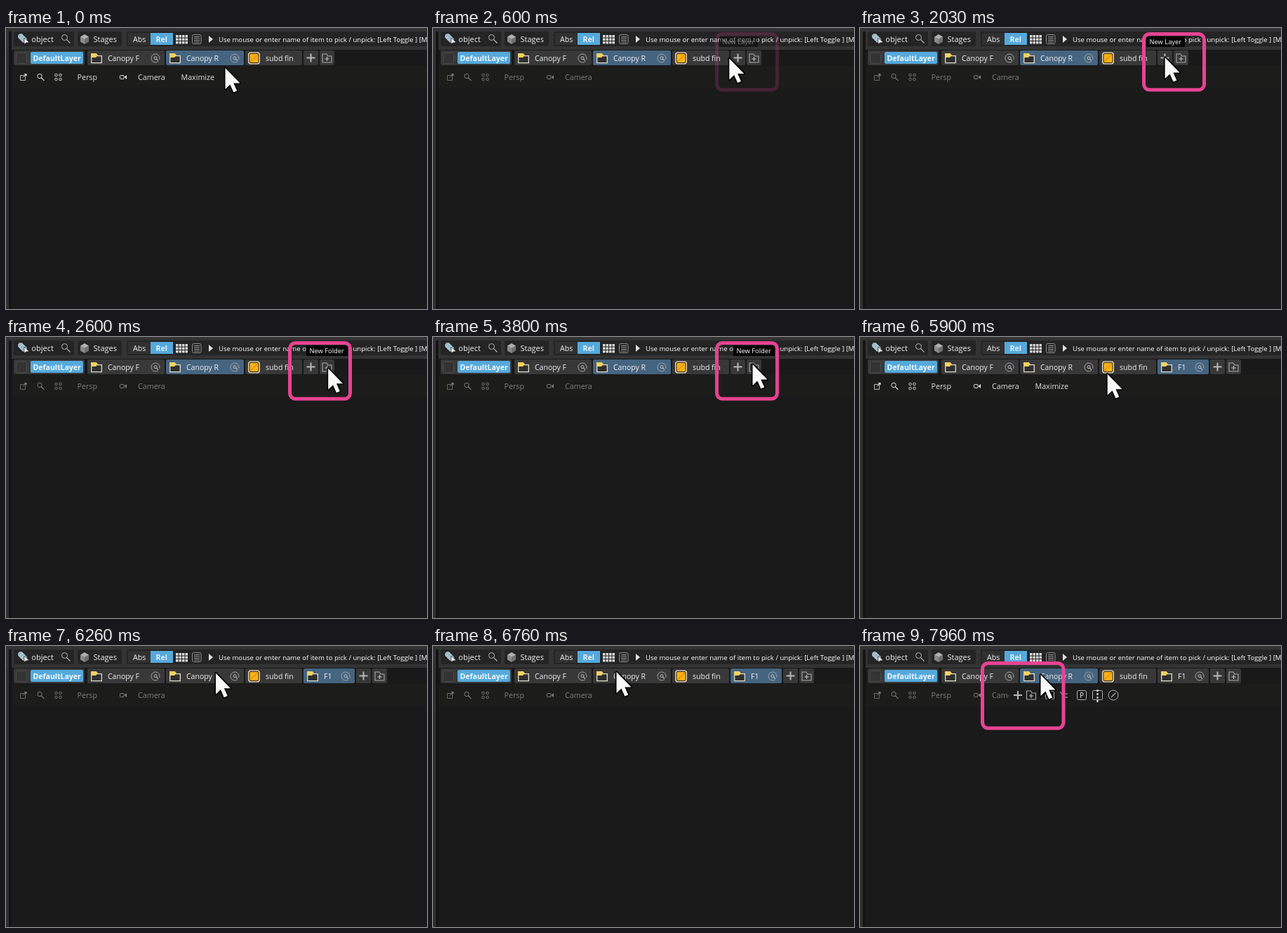
An HTML page with a canvas that plays this animation: 600x400 px, repeating every 8 s.

```html
<!DOCTYPE html>
<html lang="en">
<head>
<meta charset="utf-8">
<title>Layer tabs</title>
<style>
html, body { margin: 0; width: 100%; height: 100%; overflow: hidden; background: #1a1a1a; }
canvas { display: block; }
</style>
</head>
<body>
<canvas id="stage" width="600" height="400"></canvas>
<script>
const c = document.getElementById('stage').getContext('2d');
const LOOP = 8000, PINK = '#e84393', BLUE = '#55a9dc', TAB = '#383838', ACTIVE = '#456480', GROUP = '#242424';

// Each move eases the cursor to (x, y); bend bows the way there
const home = { x: 312, y: 57 };
const moves = [
  { from: 30, to: 800, x: 434, y: 42 },
  { from: 2030, to: 2360, x: 460, y: 47 },
  { from: 2560, to: 2800, x: 455, y: 39 },
  { from: 4430, to: 4960, x: 458, y: 68, bend: [22, -27] },
  { from: 5530, to: 6330, x: 296, y: 38, bend: [0, 5] },
  { from: 6360, to: 6760, x: 261, y: 37 },
  { from: 7900, to: 7960, x: 257, y: 41 }
];

const ramp = (t, a, b) => Math.min(1, Math.max(0, (t - a) / (b - a)));
const pulse = (t, a, b, d, e) => ramp(t, a, b) * (1 - ramp(t, d, e));
const easeOut = k => 1 - (1 - k) ** 1.7;

function cursorAt(t) {
  let { x, y } = home;
  for (const m of moves) {
    const p = easeOut(ramp(t, m.from, m.to)), bow = Math.sin(Math.PI * p);
    const [bx, by] = m.bend || [0, 0];
    x += (m.x - x) * p + bx * bow;
    y += (m.y - y) * p + by * bow;
  }
  return [x, y];
}

function paint(fill, stroke, lw = 1) {
  if (fill) { c.fillStyle = fill; c.fill(); }
  if (stroke) { c.strokeStyle = stroke; c.lineWidth = lw; c.stroke(); }
}

function box(x, y, w, h, fill, r = 0, stroke, lw) {
  c.beginPath();
  c.roundRect(x, y, w, h, r);
  paint(fill, stroke, lw);
}

function poly(points, fill, stroke, lw) {
  c.beginPath();
  for (let i = 0; i < points.length; i += 2) c.lineTo(points[i], points[i + 1]);
  c.closePath();
  paint(fill, stroke, lw);
}

function line(x1, y1, x2, y2, color, lw) {
  c.beginPath();
  c.moveTo(x1, y1);
  c.lineTo(x2, y2);
  paint(null, color, lw);
}

function ring(x, y, r, color, lw, fill) {
  c.beginPath();
  c.arc(x, y, r, 0, 2 * Math.PI);
  paint(fill, color, lw);
}

function text(s, x, y, size, color = '#f0f0f0', weight = 400) {
  c.font = `${weight} ${size}px "Open Sans", "Noto Sans", sans-serif`;
  c.fillStyle = color;
  c.fillText(s, x, y);
}

function faded(alpha, draw) {
  if (alpha <= 0) return;
  c.save();
  c.globalAlpha = alpha;
  draw();
  c.restore();
}

function lens(x, y, r, color) {
  ring(x, y, r, color, 1);
  line(x + r * .7, y + r * .7, x + r * 2, y + r * 2, color, 1.2);
}

function plus(x, y, r, color = '#b8b8b8', lw = 2) {
  line(x - r, y, x + r, y, color, lw);
  line(x, y - r, x, y + r, color, lw);
}

function folderShape(x, y, w, h, fill, stroke, lw) {
  poly([x, y, x + w * .45, y, x + w * .6, y + 3, x + w, y + 3, x + w, y + h, x, y + h], fill, stroke, lw);
}

function folder(x) {
  folderShape(x + .7, 36.7, 14.6, 13, '#2f2f2f', '#e0dccb', 1.3);
  poly([x, 36, x + 7, 36, x + 10, 39, x + 7, 42, x, 42], '#f5d060');
}

function newFolder(x, y) {
  folderShape(x - 6.5, y - 6, 13, 12, null, '#aaa', 1.1);
  plus(x, y + 1, 3, '#bbb', 1.2);
}

function cube(x, y, r) {
  const corner = i => [x + r * Math.sin(i * Math.PI / 3), y - r * Math.cos(i * Math.PI / 3)];
  ['#707070', '#8b8b8b', '#b0b0b0'].forEach((shade, i) =>
    poly([x, y, ...corner(2 * i + 1), ...corner(2 * i + 2), ...corner(2 * i + 3)], shade));
}

function isolate(x) {
  c.beginPath();
  c.arc(x, 43, 6, .9, 6.6);
  paint(null, '#a5a5a5');
  lens(x, 42.7, 2, '#c0c0c0');
}

function folderTab(x, w, label, active) {
  box(x, 32, w, 21, active ? ACTIVE : TAB, 2);
  folder(x + 5);
  text(label, x + 29, 47, 10.5);
  isolate(x + w - 13);
}

function topBar() {
  box(0, 0, 600, 31, '#333');
  box(0, 31, 600, 23, '#191919');
  box(0, 31, 4, 369, '#303030');
  box(4, 5, 4, 395, '#141414');

  box(11, 5, 86, 21, GROUP, 2);
  for (let i = 0; i < 3; i++) ring(21 + i * 2.5, 12 + i * 2.5, 3.6, '#d5e2e8', .7, '#8fb4c8');
  poly([26, 14, 26, 23, 28.5, 21, 33, 20.5], '#fff', '#222', .7);
  text('object', 36.3, 20, 11);
  lens(83.5, 13.5, 4, '#b5b5b5');

  box(102, 5, 63, 21, GROUP, 2);
  cube(112, 16, 7);
  text('Stages', 124.5, 20, 11);

  box(172, 5, 428, 21, GROUP, 2);
  box(174, 7, 32, 17, '#303030');
  text('Abs', 181, 20, 10.6);
  box(206, 7, 32, 17, BLUE);
  text('Rel', 213.5, 20, 10.6, '#e4f0f8', 700);
  for (let i = 0; i < 12; i++) box(242 + i % 4 * 4.5, 10 + (i >> 2) * 4.5, 3.5, 3.5, '#d8d8d8');
  box(265.5, 9.5, 12.5, 13, null, 2, '#8f8f8f');
  for (let y = 12.5; y < 21; y += 2.5) line(268, y, 276, y, '#999');
  poly([289, 11, 295, 16, 289, 21], '#e0e0e0');
  text('Use mouse or enter name of item to pick / unpick: [Left Toggle ] [Middle', 303, 20, 9.6, '#fff');
}

function tabs(folderAdded, canopyActive) {
  box(11, 32, 101, 21, TAB, 2);
  box(14.5, 35.5, 15, 15, '#333', 2, '#4b4b4b');
  box(35, 34, 75, 17, BLUE, 2);
  text('DefaultLayer', 38.5, 47, 10.5, '#f4f9fc', 700);
  folderTab(116, 110, 'Canopy F', false);
  folderTab(228, 111, 'Canopy R', canopyActive);
  box(341, 32, 81, 21, TAB, 2);
  box(345.7, 35.2, 15.6, 15.6, '#3a2c10', 3, '#efe6cf', 1.3);
  box(347.5, 37, 12, 12, '#fbb117', 1);
  line(348, 48, 359, 38, '#dc8d08', 1.2);
  text('subd fin', 370, 47, 10.5);
  let x = 424;
  if (folderAdded) {
    folderTab(x, 73, 'F1', !canopyActive);
    x = 499;
  }
  box(x, 32, 21, 21, TAB, 2);
  plus(x + 10.5, 42.5, 6);
  box(x + 23, 32, 21, 21, TAB, 2);
  newFolder(x + 33.5, 43);
}

function viewMenu(lit) {
  box(8, 54, 592, 346, '#1a1a1a');
  box(8, 54, 592, 31, '#1c1c1b');
  const v = 125 + 100 * Math.min(1, lit * 2), color = `rgb(${v},${v},${v})`;
  box(20.5, 67.5, 7, 7, null, 0, color, .8);
  line(24, 70.5, 28.5, 66, color);
  poly([25.5, 65, 29.5, 65, 29.5, 69], color);
  lens(48, 68.5, 3.2, color);
  for (let i = 0; i < 4; i++) ring(71.5 + i % 2 * 6, 67 + (i >> 1) * 6, 1.8, color, .9);
  text('Persp', 101.5, 74, 10.7, color);
  box(162.5, 67.5, 5.5, 5, null, 1, color);
  poly([168.5, 70, 172, 67, 172, 73], color);
  text('Camera', 188, 74, 10.7, color);
  faded(lit, () => text('Maximize', 249.5, 74, 10.7, color));
}

function layerTools() {
  const grey = '#b0b0b0';
  box(212, 58, 160, 24, '#1c1c1c', 2);
  plus(225, 70, 6);
  newFolder(244, 70);
  box(264.5, 64.5, 12, 11, null, 1, grey);
  line(285, 65, 291, 73, grey);
  line(287, 68, 296, 68, grey);
  line(291, 73, 296, 73, grey);
  box(309.5, 63.5, 13, 13, null, 2, grey);
  text('P', 313, 74, 10);
  box(331.5, 63.5, 14, 13, null, 1, grey);
  for (let y = 62; y < 78; y += 5) line(338.5, y, 338.5, y + 3, '#eee', 2);
  ring(361, 70, 7, grey);
  line(358, 73, 364, 67, grey, 1.2);
}

function tooltip(label, x, w) {
  box(x, 12, w, 15, '#050505');
  text(label, x + 4.5, 23, 9.35, '#fff');
}

const callout = (x, y, w, h) => box(x + 2.5, y + 2.5, w - 5, h - 5, null, 8, PINK, 5);

function cursor(x, y) {
  c.save();
  c.translate(x, y);
  c.scale(1.76, 1.76);
  c.lineJoin = 'round';
  const arrow = [.3, 0, .3, 17, 4.2, 13.3, 7, 19.6, 9.8, 18.4, 7, 12.2, 12.2, 12.2];
  poly(arrow, null, '#050505', 2);
  poly(arrow, '#f8f8f8');
  c.restore();
}

function draw(t) {
  viewMenu(t < 4000 ? 1 - ramp(t, 100, 350) : pulse(t, 4860, 5060, 5960, 6250));
  topBar();
  tabs(t >= 3860, t < 3860 || t >= 7190);
  faded(ramp(t, 7260, 7400), layerTools);
  faded(pulse(t, 500, 720, 2060, 2130), () => tooltip('New Layer', 408, 55));
  faded(pulse(t, 2240, 2350, 3830, 3900), () => tooltip('New Folder', 428, 59));
  faded(pulse(t, 550, 800, 3800, 3930), () => callout(402, 6, 91, 84.5));
  faded(ramp(t, 7330, 7600), () => callout(172, 22, 120.5, 97.5));
  cursor(...cursorAt(t));
}

const start = performance.now();
function frame() {
  draw((performance.now() - start) % LOOP);
  requestAnimationFrame(frame);
}
frame();
</script>
</body>
</html>
```
